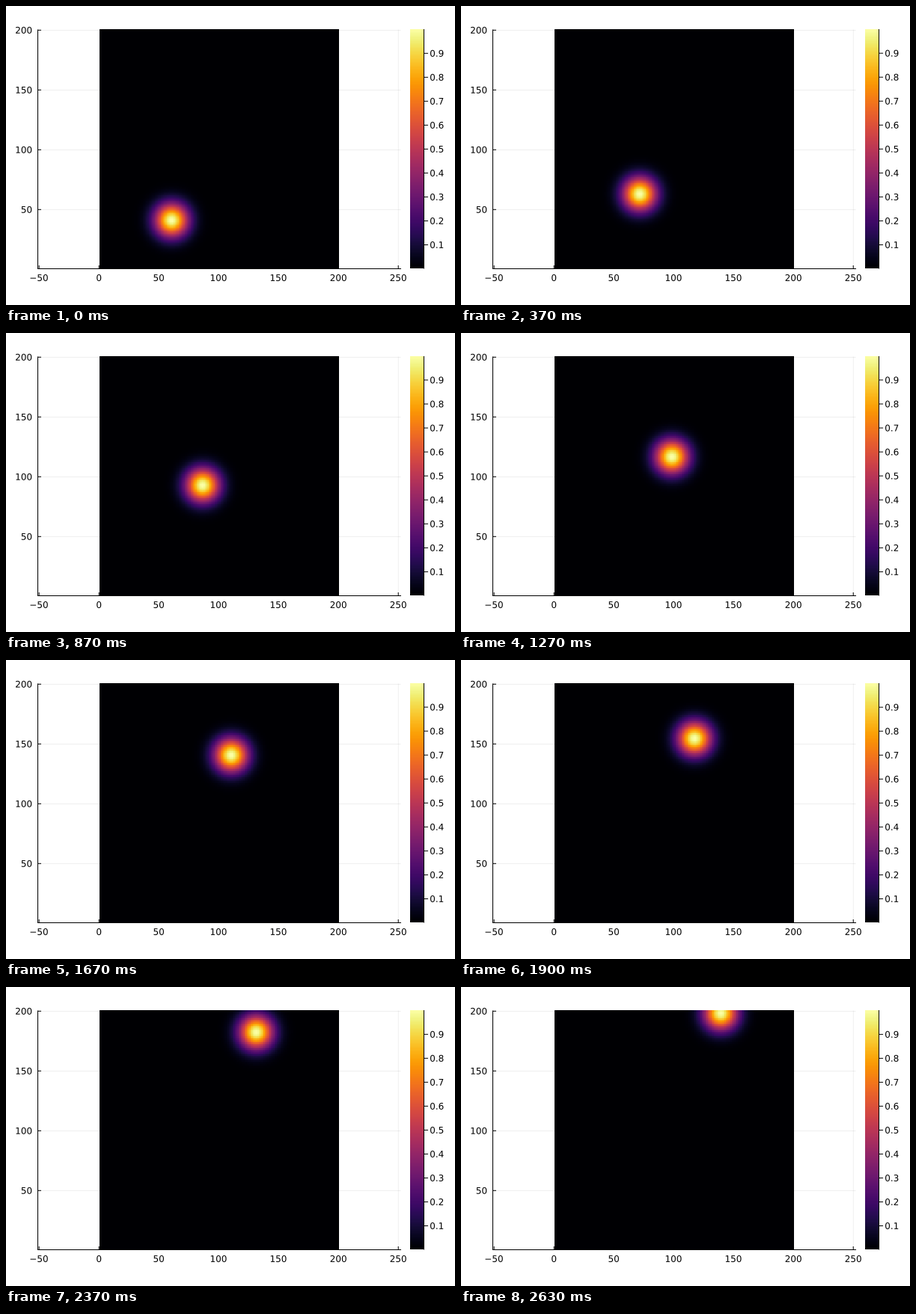
A matplotlib script for the animation above (2.66 s loop, 600 by 400 pixels).

```python
import numpy as np
import matplotlib.pyplot as plt
from matplotlib.animation import FuncAnimation
from matplotlib.collections import LineCollection
from matplotlib.patches import PathPatch
from matplotlib.textpath import TextPath
from matplotlib.transforms import Affine2D

plt.rcParams["font.family"] = "DejaVu Sans"

DPI = 100
LOOP_MS = 2660
TICK_MS = 10
CELLS = 200
SCALE = 1.6                      # pixels per data unit
LEFT, RIGHT, TOP, BOTTOM = 42.5, 527.5, 31.5, 351.5
BAR_AXIS = 558.5
EM = 12
DIGIT_DROP = 4.4                 # from digit centre to baseline

fig = plt.figure(figsize=(600 / DPI, 400 / DPI), dpi=DPI, facecolor="white")
ax = fig.add_axes([0, 0, 1, 1])
ax.axis("off")


def px(x):
    return 285 + (x - 100.5) * SCALE


def py(y):
    return BOTTOM - (y - 0.5) * SCALE


def lines(segments, color="black", width=1.0, z=3):
    group = LineCollection(segments, colors=[color], zorder=z,
                           linewidths=width * 72 / DPI, snap=False,
                           capstyle="butt")
    ax.add_collection(group)
    return group


class Label:
    """Outlined text placed with subpixel accuracy by its ink box."""

    def __init__(self, text, align):
        path = TextPath((0, 0), text, size=EM)
        box = path.get_extents()
        self.shift = -(box.x0 + align * box.width)
        self.patch = PathPatch(path, facecolor="black", edgecolor="none",
                               linewidth=0, zorder=4, snap=False)
        ax.add_patch(self.patch)

    def place(self, x, y):
        flip = Affine2D().scale(1, -1).translate(x + self.shift, y + DIGIT_DROP)
        self.patch.set_transform(flip + ax.transData)


# Axes, grid and tick labels
x_ticks = range(-50, 251, 50)
y_ticks = range(50, 201, 50)
lines([[(px(x), TOP), (px(x), BOTTOM)] for x in x_ticks]
      + [[(LEFT, py(y)), (RIGHT, py(y))] for y in y_ticks],
      color=(0, 0, 0, 0.1), width=0.6, z=0)
lines([[(LEFT - 0.5, BOTTOM), (RIGHT + 0.5, BOTTOM)],
       [(LEFT, TOP), (LEFT, BOTTOM)]]
      + [[(px(x), BOTTOM), (px(x), BOTTOM - 4.5)] for x in x_ticks]
      + [[(LEFT, py(y)), (LEFT + 4.5, py(y))] for y in y_ticks])
for x in x_ticks:
    Label(str(x).replace("-", "\u2212"), 0.5).place(px(x), 363.5)
for y in y_ticks:
    Label(str(y), 1).place(34.3, py(y))

# Heatmap and colour bar
grid = np.linspace(0, 1, CELLS)
heat = ax.imshow(np.zeros((CELLS, CELLS)), cmap="inferno", origin="lower",
                 extent=(125, 445, 351, 31), interpolation="nearest",
                 aspect="auto", zorder=1)
ax.imshow(np.arange(256)[:, None], cmap="inferno", origin="lower",
          extent=(540, 558, 351, 31), interpolation="nearest",
          aspect="auto", zorder=1)
lines([[(BAR_AXIS, TOP - 0.5), (BAR_AXIS, BOTTOM)]])
bar_values = np.arange(1, 10) / 10
bar_ticks = lines([])
bar_labels = [Label(f"{v:.1f}", 0) for v in bar_values]

ax.set_xlim(0, 600)
ax.set_ylim(400, 0)


def bump(step):
    """Gaussian of width 0.05 drifting up and to the right."""
    gx = np.exp(-200 * (grid - 0.3 - 0.005 * step) ** 2)
    gy = np.exp(-200 * (grid - 0.2 - 0.01 * step) ** 2)
    return np.outer(gy, gx)


def update(i):
    step = int(0.3 * i + 0.15)   # 30 steps per second on a 10 ms clock
    field = bump(step)
    peak = field.max()
    heat.set_data(field)
    heat.set_clim(0, peak)
    heights = BOTTOM - 320 * bar_values / peak
    bar_ticks.set_segments([[(BAR_AXIS, y), (BAR_AXIS + 5.5, y)]
                            for y in heights])
    for label, y in zip(bar_labels, heights):
        label.place(567, y)
    return []


anim = FuncAnimation(fig, update, frames=LOOP_MS // TICK_MS,
                     interval=TICK_MS, repeat=True, repeat_delay=0,
                     init_func=lambda: update(0))
plt.show()
```
